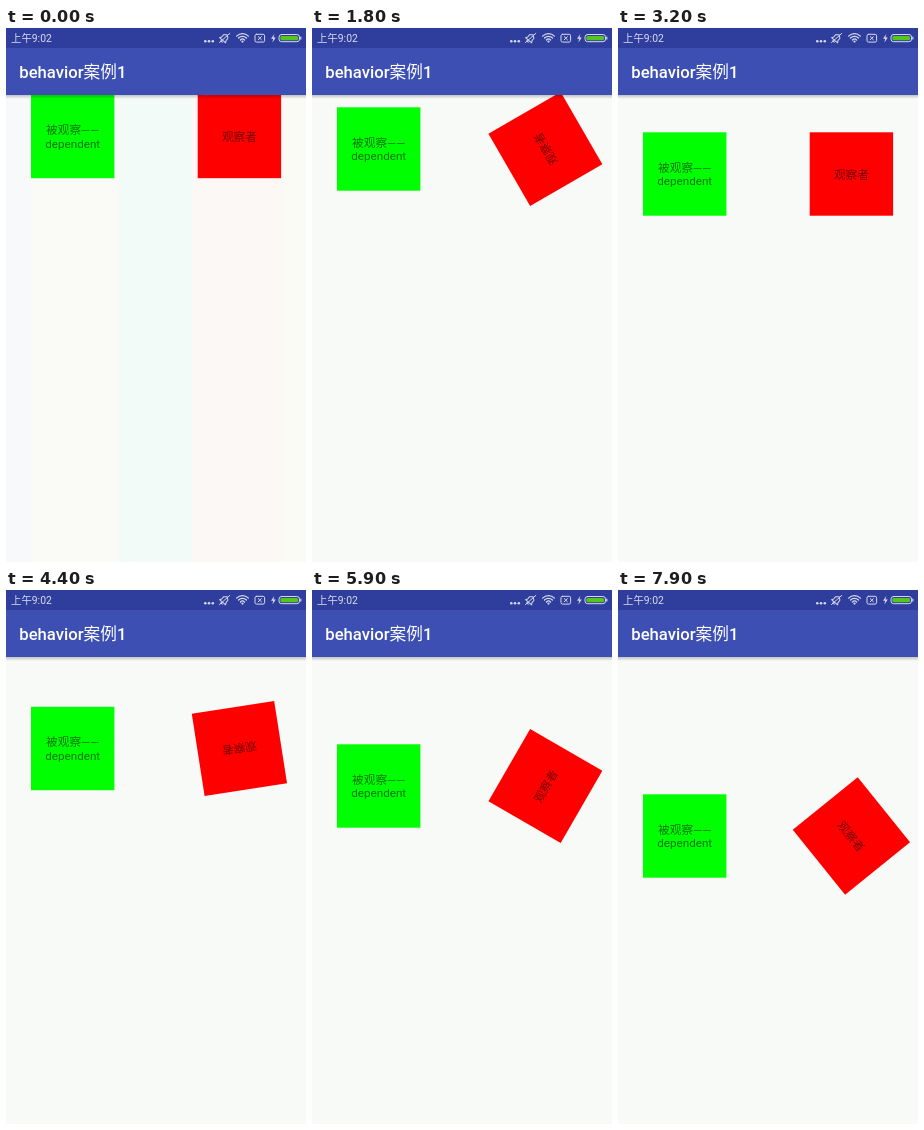
An HTML page with a canvas that plays this animation: 300 px wide and 534 px high, repeating every 8000 ms.

```html
<!DOCTYPE html>
<html lang="zh">
<head>
<meta charset="utf-8">
<title>behavior案例1</title>
<style>
html, body { margin: 0; width: 100%; height: 100%; overflow: hidden; background: #f8faf8; }
canvas { display: block; width: 300px; height: 534px; }
</style>
</head>
<body>
<canvas id="stage"></canvas>
<script>
const W = 300, H = 534, LOOP = 8000, TICK = 100;
const BAR_TOP = 20, BAR_END = 67, FIRST_TOP = 66.8, SIZE = 83.4;
const STEP = 12.5, TURN = 600, SPIN_MS = 300;
const TAPS = [1480, 2169, 2660, 4166, 4694, 5224, 5750, 6218, 6682.5, 7180, 7666];
const FONTS = 'Roboto, "Noto Sans CJK SC", "Noto Sans CJK", sans-serif';
const CJK = '"Noto Sans CJK SC", "Noto Sans CJK", sans-serif';

const canvas = document.getElementById('stage');
const ctx = canvas.getContext('2d');
const dpr = window.devicePixelRatio || 1;
canvas.width = W * dpr;
canvas.height = H * dpr;

function rect(x, y, w, h, color) {
  ctx.fillStyle = color;
  ctx.fillRect(x, y, w, h);
}

function text(str, x, y, font, color, align = 'left') {
  ctx.font = font;
  ctx.fillStyle = color;
  ctx.textAlign = align;
  ctx.fillText(str, x, y);
  return ctx.measureText(str).width;
}

function line(points, close) {
  ctx.beginPath();
  points.forEach(([x, y]) => ctx.lineTo(x, y));
  if (close) ctx.closePath();
  ctx.stroke();
}

function dot(x, y, r) {
  ctx.beginPath();
  ctx.arc(x, y, r, 0, Math.PI * 2);
  ctx.fill();
}

function pill(x, y, w, h, r) {
  ctx.beginPath();
  ctx.roundRect(x, y, w, h, r);
}

// Each tap lowers both squares and adds a turn to the observer.
function pose(t) {
  const taps = TAPS.filter(tap => tap <= t);
  const n = taps.length;
  if (!n) return { top: FIRST_TOP, angle: 0 };
  const p = Math.min(1, (t - taps[n - 1]) / SPIN_MS);
  const eased = 0.5 - Math.cos(Math.PI * p) / 2;
  return { top: FIRST_TOP + STEP * n, angle: TURN * (n - 1 + eased) };
}

function background(t) {
  rect(0, 0, W, H, '#f8faf8');
  ctx.globalAlpha = Math.max(0, Math.min(1, 1 - (t - 100) / 1200));
  const bands = [[0, '#f8f9fb'], [25, '#fafbf7'], [113, '#f3fbf9'], [186, '#fcf8f5'], [278, '#fafbf4']];
  bands.forEach(([x, color], i) => {
    const end = i + 1 < bands.length ? bands[i + 1][0] : W;
    rect(x, BAR_END, end - x, H - BAR_END, color);
  });
  ctx.globalAlpha = 1;
}

function squares({ top, angle }) {
  const ink = 'rgba(0,0,0,0.54)', font = '11.67px ' + FONTS;
  rect(25, top, SIZE, SIZE, '#00ff00');
  text('被观察——', 66.7, top + 39.2, font, ink, 'center');
  text('dependent', 66.7, top + 53, font, ink, 'center');

  ctx.save();
  ctx.translate(191.7 + SIZE / 2, top + SIZE / 2);
  ctx.rotate(angle * Math.PI / 180);
  rect(-SIZE / 2, -SIZE / 2, SIZE, SIZE, '#ff0000');
  text('观察者', 0, 4.7, font, ink, 'center');
  ctx.restore();
}

function statusIcons() {
  const tint = '#d6d9ee';
  ctx.fillStyle = ctx.strokeStyle = tint;
  ctx.lineWidth = 1;
  ctx.lineCap = ctx.lineJoin = 'round';
  [199.3, 203, 206.8].forEach(x => dot(x, 13.2, 1.3));

  // muted bell
  ctx.save();
  ctx.translate(218.5, 10);
  ctx.rotate(0.7);
  line([[-4, 3], [-2.8, 1], [-2.8, -2], [0, -4.2], [2.8, -2], [2.8, 1], [4, 3]], true);
  line([[-1, 4.6], [1, 4.6]]);
  ctx.restore();
  line([[213.4, 14.6], [223.8, 5.4]]);

  // wifi
  ctx.lineWidth = 1.3;
  [2.9, 5.6, 8.3].forEach(r => {
    ctx.beginPath();
    ctx.arc(236.5, 14, r, -Math.PI * 0.75, -Math.PI * 0.25);
    ctx.stroke();
  });
  dot(236.5, 13.6, 1.1);

  // no SIM
  ctx.lineWidth = 1;
  pill(249, 6.3, 9.6, 7.8, 1.5);
  ctx.stroke();
  line([[252.2, 8.6], [255.4, 11.8]]);
  line([[255.4, 8.6], [252.2, 11.8]]);

  // charging bolt
  ctx.beginPath();
  [[268.3, 6], [265, 10.8], [267.2, 10.8], [266.4, 14.4], [269.8, 9.4], [267.5, 9.4]]
    .forEach(([x, y]) => ctx.lineTo(x, y));
  ctx.fill();

  // battery
  pill(273, 6.5, 20.5, 7.2, 2.6);
  ctx.stroke();
  rect(294.2, 8.7, 1.2, 2.8, tint);
  ctx.fillStyle = '#55c522';
  pill(274.4, 7.9, 17.7, 4.4, 1.5);
  ctx.fill();
}

function header() {
  const shade = ctx.createLinearGradient(0, BAR_END, 0, BAR_END + 4);
  shade.addColorStop(0, 'rgba(0,0,0,0.22)');
  shade.addColorStop(1, 'rgba(0,0,0,0)');
  rect(0, BAR_END, W, 4, shade);
  rect(0, 0, W, BAR_END, '#3d4fb3');
  rect(0, 0, W, BAR_TOP, '#2f3e9d');

  text('上午9:02', 5, 14.2, '10.4px ' + FONTS, '#dadded');
  statusIcons();

  let x = 13.3;
  const latin = '500 16.67px ' + FONTS;
  x += text('behavior', x, 50.2, latin, '#fff');
  x += text('案例', x, 50.2, '16.67px ' + CJK, '#fff');
  text('1', x, 50.2, latin, '#fff');
}

function draw(now) {
  const t = Math.floor((now % LOOP) / TICK) * TICK;
  ctx.setTransform(dpr, 0, 0, dpr, 0, 0);
  background(t);
  squares(pose(t));
  header();
}

let start;
function loop(now) {
  if (start === undefined) start = now;
  draw(now - start);
  requestAnimationFrame(loop);
}
draw(0);
requestAnimationFrame(loop);
</script>
</body>
</html>
```
